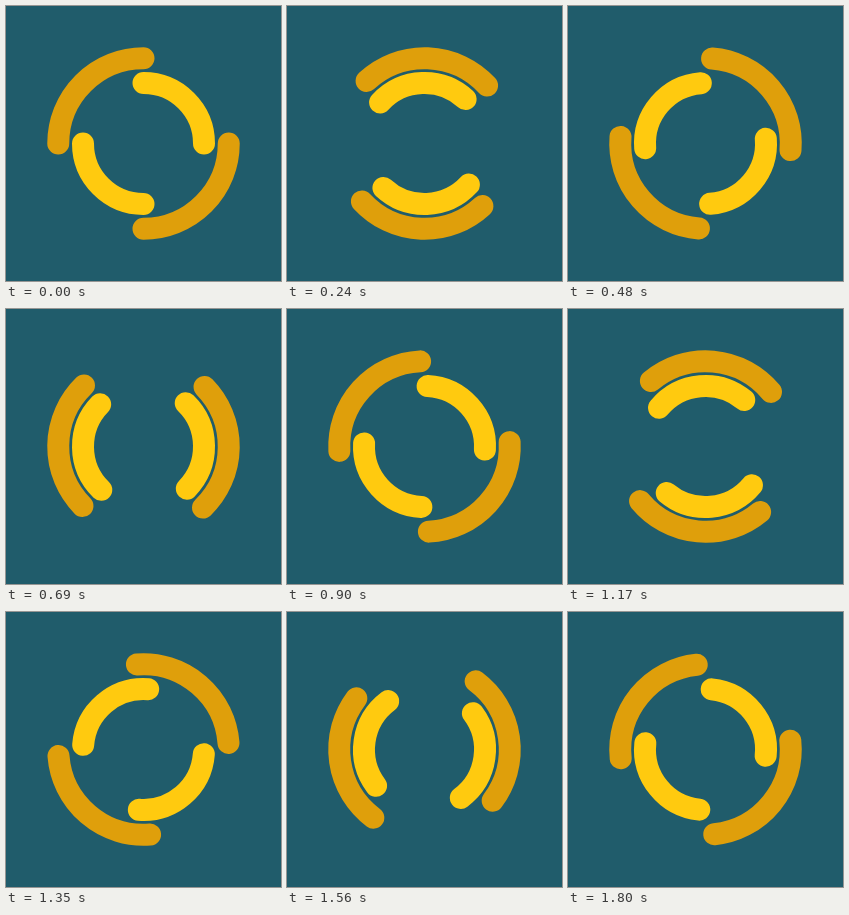
These frames come from a looping animation (275 px wide and 275 px high, 1.83 s). An HTML page:

```html
<!DOCTYPE html>
<html lang="en">
<head>
<meta charset="utf-8">
<title>Double ring spinner</title>
<style>
html, body { margin: 0; height: 100%; overflow: hidden; background: #205c6b; }
svg { display: block; width: 100vw; height: 100vh; }
path { fill: none; stroke-width: 8; stroke-linecap: round; }
</style>
</head>
<body>
<svg viewBox="-50 -50 100 100">
  <path id="outer" stroke="#df9f0b" d="M31 0A31 31 0 0 1 0 31M-31 0A31 31 0 0 1 0-31"/>
  <path id="inner" stroke="#ffca0f" d="M0 22A22 22 0 0 1-22 0M0-22A22 22 0 0 1 22 0"/>
</svg>
<script>
const STEP = 30, STEPS = 61;
const outer = document.getElementById('outer');
const inner = document.getElementById('inner');
const start = performance.now();

function draw() {
  const step = Math.floor((performance.now() - start) / STEP) % STEPS;
  const angle = step * 360 / STEPS;
  outer.setAttribute('transform', `rotate(${angle})`);
  inner.setAttribute('transform', `rotate(${-angle})`);
  requestAnimationFrame(draw);
}
draw();
</script>
</body>
</html>
```
